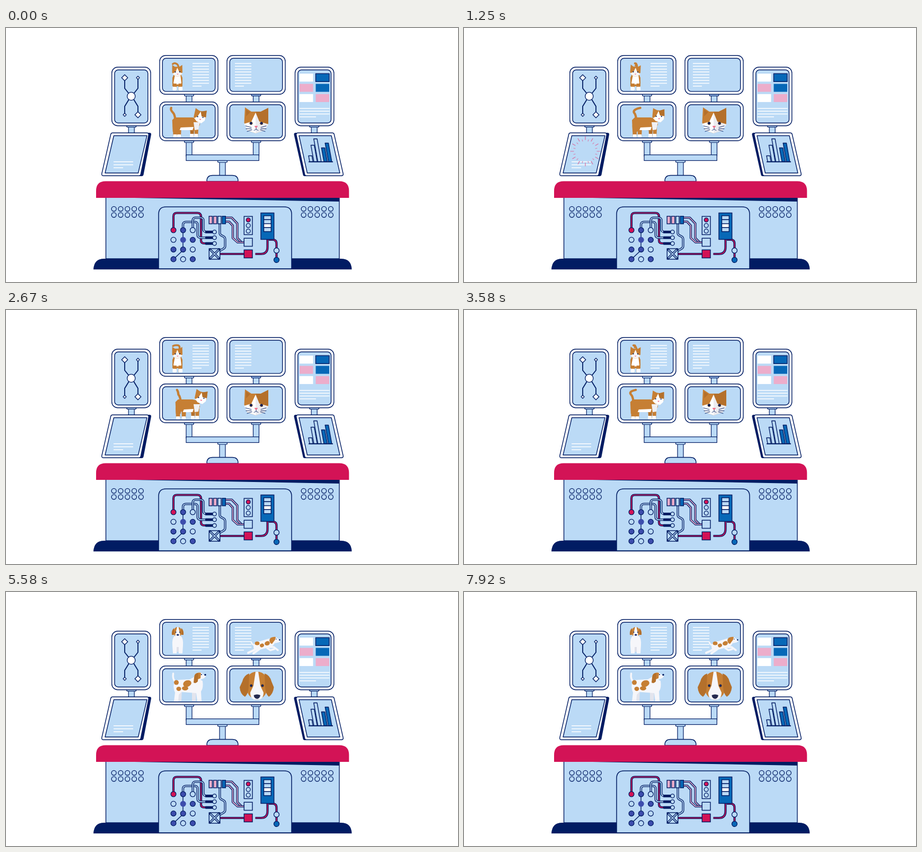
These frames come from a looping animation (853x480 px, 8 s). An HTML page:

```html
<!DOCTYPE html>
<html lang="en">
<head>
<meta charset="utf-8">
<title>Pet control desk</title>
<style>
  html, body { margin: 0; width: 100%; height: 100%; overflow: hidden; background: #fff; }
  svg { display: block; width: 100%; height: 100%; }
</style>
</head>
<body>
<svg id="stage" viewBox="0 0 853 480"></svg>
<script>
const NAVY = '#011c63', SKY = '#bbdaf6', RED = '#d31356', PINK = '#ecadcb',
      BLUE = '#0768b7', INDIGO = '#3d4dad', FUR = '#c67f34', SHADE = '#b4702b',
      WHITE = '#fff', DOG = '#f6f6fa';

const rect = (x, y, x2, y2, fill, r = 0, stroke = NAVY, w = 1.4) =>
  `<rect x="${x}" y="${y}" width="${x2 - x}" height="${y2 - y}" rx="${r}" fill="${fill}" stroke="${stroke}" stroke-width="${w}"/>`;
const block = (x, y, x2, y2, fill, r = 0) => rect(x, y, x2, y2, fill, r, 'none');
const path = (d, fill = 'none', stroke = 'none', w = 1.4) =>
  `<path d="${d}" fill="${fill}" stroke="${stroke}" stroke-width="${w}" stroke-linejoin="round"/>`;
const line = (d, stroke, w) => `<path d="${d}" fill="none" stroke="${stroke}" stroke-width="${w}" stroke-linecap="round" stroke-linejoin="round"/>`;
const dot = (x, y, r, fill, stroke = NAVY, w = 1.3) =>
  `<circle cx="${x}" cy="${y}" r="${r}" fill="${fill}" stroke="${stroke}" stroke-width="${w}"/>`;
const oval = (x, y, rx, ry, fill, turn = 0) =>
  `<ellipse cx="${x}" cy="${y}" rx="${rx}" ry="${ry}" fill="${fill}" transform="rotate(${turn} ${x} ${y})"/>`;
const wire = (d, core) => path(d, 'none', NAVY, 4.2) + path(d, 'none', core, 1.7);
const range = n => [...Array(n).keys()];

function monitor(x, y, x2, y2) {
  return rect(x, y, x2, y2, WHITE, 11) + rect(x + 5.3, y + 5.3, x2 - 5.3, y2 - 5.3, SKY, 6.5);
}

function neck(x, y, bottom, cap = SKY) {
  return rect(x - 5.5, y, x + 5.5, bottom, SKY, 0, NAVY, 1.2) + rect(x - 9, y, x + 9, y + 3.5, cap, 1.7, NAVY, 1.2);
}

function textLines(x, y, width, count, lastWidth, gap = 5.35) {
  return range(count).map(i =>
    path(`M${x} ${y + i * gap}h${i < count - 1 ? width : lastWidth}`, 'none', WHITE, 1.5)).join('');
}

function tablet(outer, inner, dark) {
  return line(dark, NAVY, 6) + path(dark, NAVY) +
    path(outer, NAVY, NAVY, 8) + path(outer, WHITE, WHITE, 5.2) +
    path(inner, SKY, NAVY, 1.4);
}

function screens() {
  const tiles = [WHITE, BLUE, PINK, BLUE, WHITE, PINK].map((c, i) => {
    const x = i % 2 ? 584.5 : 554, y = 86.3 + 19.3 * (i >> 1);
    return rect(x, y, x + 25.5, y + 15, c, 0, i === 1 ? NAVY : 'none');
  }).join('');
  const diamond = (x, y, r) => path(`M${x} ${y - r}l${r} ${r}l${-r} ${r}l${-r} ${-r}z`, WHITE, NAVY, 1.3);
  return neck(345.5, 125, 140) + neck(472, 125, 140, '#8fb4e4') +
    neck(345.5, 213, 242) + neck(472, 213, 242) +
    rect(340, 239.7, 477.3, 250.5, SKY, 0, NAVY, 1.2) + neck(408.5, 250.5, 279) +
    path('M379 290v-1q0-10.500 11-10.500h37q11 0 11 10.500v1z', SKY, NAVY) +
    neck(236.700, 184, 199) + neck(581.700, 184, 199) +
    [290, 417].map(x => monitor(x, 52, x + 110, 125.2) + monitor(x, 139.700, x + 110, 213)).join('') +
    monitor(199.700, 74, 273, 184.800) + monitor(545.500, 74, 618.800, 184.800) +
    textLines(352, 67, 31, 9, 17) + textLines(432, 67, 31, 9, 17) +
    line('M224 94v20l8 10M249 94v20l-8 10M224 164v-16l8-13M249 164v-16l-8-13', NAVY, 1.8) +
    dot(236.300, 129, 7.600, WHITE) +
    diamond(224, 94, 5.800) + diamond(249, 94, 3) + diamond(224, 164, 3) + diamond(249, 164, 5.800) +
    tiles + textLines(554, 152, 56.500, 4, 31, 5.300);
}

function tablets() {
  const bars = [[573, 11], [581, 31], [588.5, 43], [600, 26], [608.5, 35]].map(([x, h], i) =>
    path(`M${x} 252.500l${-h * .18} ${-h}h6.300l${h * .18} ${h}z`, i < 3 ? SKY : BLUE, NAVY, 1.4)).join('');
  return tablet('M201 201.500H266L251 276H184z', 'M203.500 203.500H266L249.500 274H187z', 'M268 201L271 201L256.500 277L252 277z') +
    textLines(203, 252.700, 37, 3, 18, 5.700) +
    tablet('M551 201.500H616L633 276H567z', 'M553 203.500H614L630 274H568.500z', 'M549 201L546.500 201L563.500 277L567 277z') +
    bars + path('M571 252.900h46', 'none', NAVY, 1.6);
}

function desk() {
  const holes = [203.600, 561.700].map(x => range(10).map(i =>
    dot(x + 12.800 * (i % 5), 341.800 + 11.500 * Math.floor(i / 5), 4.500, SKY)).join('')).join('');
  return path('M165 456.300q1-20.300 20-20.300H632q20 0 20.500 20.300z', NAVY) +
    rect(188.500, 315, 629, 436, SKY) + path('M188 320H629V328z', NAVY) +
    path('M170 321v-13q0-18.500 18-18.500H629q18.300 0 18.300 18.500v13z', RED) + holes +
    path('M288 455V352q0-14 14-14H525q14 0 14 14V455z', SKY, NAVY, 1.5);
}

function panel() {
  const knobs = [RED, INDIGO, SKY, SKY, INDIGO, INDIGO, INDIGO, INDIGO, SKY, INDIGO, SKY, INDIGO];
  const sockets = [385.500, 396.300, 407.300].map(y =>
    block(376, y - 2.500, 391, y + 2.500, NAVY, 1) + dot(393.500, y, 3.600, SKY)).join('');
  const tubes = [PINK, PINK, SKY, BLUE].map((c, i) =>
    rect(383.200 + 8.300 * i, 355.700, 389.400 + 8.300 * i, 370, c)).join('');
  return wire('M316 379V356q0-6.500 6.500-6.500H361q7 0 7 7V401q0 6 6 6h4', RED) +
    wire('M334 379v-7q0-5.500 6-5.500h16q5.500 0 5.500 5.500v18q0 6.300 6 6.300h9', SKY) +
    wire('M352.500 379v-15q0-5.500 5.500-5.500h9q5.500 0 5.500 5.500v15q0 6.500 6 6.500', SKY) +
    wire('M414 358.500h12l10.500 11V397l8 8h5', PINK) +
    wire('M414 366h7l7 7.500V397l9 8h12', PINK) +
    wire('M403.500 370v18q0 3 5 5t5 6v13q0 4-5 6l-5 3', SKY) +
    wire('M404 427h46', RED) + wire('M470.500 427H481q12.500 0 12.500-13V399', RED) +
    wire('M496 400h7q7.500 0 7.500 8V438', RED) +
    line('M317 436L334 420V382', NAVY, 1.4) +
    knobs.map((c, i) => dot(316 + 18.200 * (i % 3), 382 + 18.300 * Math.floor(i / 3), 4.900, c, i === 4 ? INDIGO : NAVY)).join('') +
    sockets + tubes +
    rect(449.300, 356, 465, 390.500, SKY) +
    [RED, SKY, SKY].map((c, i) => dot(457.200, 362.800 + 10.500 * i, 3.900, c)).join('') +
    rect(449.300, 397.300, 465, 412.500, SKY) + rect(449.300, 419.300, 465, 434.500, RED) +
    rect(383.300, 417, 403.800, 437, SKY) +
    path('M384 417.500L403 436.500M403 417.500L384 436.500', 'none', NAVY, 4) +
    path('M385.500 419L401.500 435M401.500 419L385.500 435', 'none', SKY, 1.500) +
    rect(481, 349.500, 505.700, 399.500, BLUE) +
    range(4).map(i => rect(486.500, 354.800 + 7.500 * i, 500.300, 362.300 + 7.500 * i, i === 2 ? WHITE : SKY)).join('') +
    dot(510.500, 420.500, 5, SKY) + dot(510.500, 438.300, 5, BLUE);
}

function catFace() {
  return path('M451 150L463 158H481L495 151V181L488 193L471 199L455 193L449.500 179z', FUR) +
    path('M471 158H481L495 151V181L478 177z', SHADE) +
    path('M471 160L463 177L449.500 181L455 193L471 199L488 193L495 182L478 177z', WHITE) +
    path('M471 160L478 177L495 182L488 193L471 199z', '#ececf0') +
    path('M453 154L461 159L453 167zM492 155L484 159L492 167z', SHADE) +
    dot(462.500, 180, 2.600, NAVY, '#77522d', 1) + dot(482.200, 180, 2.600, NAVY, '#77522d', 1) +
    path('M468.500 185h7l-3.500 4.500z', '#ee718f') +
    line('M472 189v2.500l-4 2M472 191.500l4 2', NAVY, .800) +
    line('M463 188l-11-3M463 190.500h-10M464 192.500l-9 3M481 188l10-3M481 190.500h10M480 192.500l9 3', NAVY, .900);
}

// Tail swing and body sway share one two-second rhythm.
function cats(t) {
  const wave = peak => Math.cos(2 * Math.PI * (t / 2000 - peak));
  const sway = wave(.4), curl = wave(.66), dx = 3.5 + 3.5 * sway;
  const rootX = 318 + 1.7 * dx, tipX = rootX - 2 + 10 * curl;
  const tail = `M${rootX} 171Q${rootX - 1} 163 ${rootX - 4} 160Q${rootX - 7 + sway * 3} 154 ${tipX} 151`;
  const back = x => path(`M${x} 184h9l-1 22h-7z`, FUR) + block(x + 1, 201, x + 8, 206.500, WHITE, 1);
  const front = (x, c) => path(`M${x} 186h8l-1 20h-6z`, c) + block(x, 200, x + 7, 206.500, WHITE, 1);
  const side = line(tail, FUR, 4.300) +
    back(321 + dx * 1.5) + front(347 + dx * .3, SHADE) +
    path(`M${313 + dx} 174L${318 + dx} 169H352L365 172L366 183L358 194L330 192L${323 + dx} 196H${314 + dx}z`, FUR) +
    path(`M${329 + dx} 188L354 187L352 193L${327 + dx} 193z`, WHITE) +
    back(314 + dx * .9) + front(355 + dx * .3, FUR) +
    path('M354 178L366 178L363 192L356 193z', '#f0f0f3') +
    `<g transform="translate(${dx * .3} ${-dx * .35}) rotate(${-5 * curl} 366 168)">` +
    path('M357 152L364 156.500L371 158L378 156L377 171L370 179L360 177L354 169z', FUR) +
    path('M367 158L361 168L355 171L360 177L369 180L375 175L377 169L369 167z', WHITE) +
    path('M367 158L378 156L377 168L369 167z', SHADE) +
    dot(361.500, 168, 1.100, NAVY, 'none') + dot(371.500, 169, 1.100, NAVY, 'none') +
    path('M364.500 172h4l-2 2.500z', '#ee718f') + '</g>';

  const tip = 321 + 6 * curl;
  const small = line(`M326 79Q${328 + 2 * sway} 68 ${322 + 3 * sway} 66.800Q${tip} 66 ${tip - 3} ${69 + 2 * curl}`, FUR, 3.600) +
    path('M317 87H330L333 94V110H314V94z', FUR) +
    path('M319 88H329L331 104L328 109L324 106L319 109L316 104z', WHITE) +
    path('M315 105h7v13h-6.500zM325.500 105h7l-.500 13h-6.500z', FUR) +
    block(314.500, 111, 322, 118, WHITE, 1.500) + block(325.500, 111, 333, 118, WHITE, 1.500) +
    `<g transform="rotate(${3 * curl} 323.500 83)">` +
    path('M314 69.500L319 73H328L333 70V84L329 90L323.500 92L318 90L313.500 84z', FUR) +
    path('M323.500 75L320 83L314 86L318 90L323.500 92L329 90L333 86L327 83z', '#f7f5f3') +
    dot(319.500, 83, 1.100, NAVY, 'none') + dot(328, 83, 1.100, NAVY, 'none') +
    path('M322 86.500h3.500l-1.700 2z', '#ee718f') + '</g>';
  return side + small + catFace();
}

function runningDog(t) {
  const phase = 2 * Math.PI * (t - 6580) / 670;
  const lift = .7 * Math.sin(phase), swing = 1.5 * Math.sin(phase);
  return `<g transform="translate(0 ${lift})">` +
    line('M470 100Q465 101 463 95', DOG, 2.600) +
    line(`M474 106L${466 + swing} 111L457 ${115 + swing}M478 108L${474 - swing} 111L467 116`, DOG, 4) +
    line(`M497 104L${505 - swing} 104L513 ${110 + swing}M493 106L${499 + swing} 110L506 108`, DOG, 3.600) +
    path('M467 103Q468 93 480 93L496 88L508 94Q504 106 491 106L475 110Q467 110 467 103z', DOG) +
    oval(474, 97, 4.500, 3.500, FUR) + oval(483, 101, 4, 3.500, FUR, -20) + oval(493, 97, 5, 4, FUR, -20) +
    oval(507, 91, 8, 5.500, DOG, 10) + path('M497 91Q499 84 509 85L508 90L502 98Q498 98 497 91z', FUR) +
    path('M511 89l6 1.500q1 5-5 5z', DOG) + dot(516.300, 90.500, 1.300, NAVY, 'none') + dot(510, 89, .800, NAVY, 'none') +
    '</g>';
}

function dogs(t) {
  const small = path('M318 83H330Q335 88 334 101L333 116H326L325 105H323L322 116H315L314 101Q313 88 318 83z', DOG) +
    path('M322 104h4v9h-4z', '#dfe0e9') +
    oval(324, 75.500, 8, 9.500, FUR) + path('M323 66h2.500l2.500 12v7h-8v-7z', DOG) +
    oval(324, 82, 4.800, 4, DOG) +
    path('M317 68Q312 73 313 81L317 81zM331 68Q336 73 335 81L331 81z', SHADE) +
    dot(320.500, 76, 1, NAVY, 'none') + dot(328, 76, 1, NAVY, 'none') + oval(324.200, 81, 2.300, 1.600, NAVY);
  const side = line('M319 169Q314 164 315.500 154', DOG, 3.500) +
    path('M324 184h8l-1 22h-7zM351 184h8l-1 22h-7z', '#e3e4ed') +
    path('M317 173Q319 166 327 166L347 165L356 160L371 168Q373 181 368 188L369 206.500H361L359 191L331 189L326 194L325 206.500H317L319 190Q315 181 317 173z', DOG) +
    oval(321.500, 171, 4.500, 4.500, FUR) + oval(326, 183, 4.500, 4, FUR) +
    oval(342, 173, 8, 6, FUR, -20) + oval(338, 182, 6, 4, FUR) +
    path('M354 163Q356 152 366 152Q371 153 372 156L377 158Q377 163 368 165L362 170L355 171z', DOG) +
    path('M358 155Q362 151 368 153L367 163L362 165z', FUR) +
    path('M355 162Q355 153 363 153L362 169Q358 174 354 171z', SHADE) +
    oval(376, 156.500, 1.700, 1.700, NAVY) + dot(369, 156, 1, NAVY, 'none');
  const face = path('M458 158Q463 150.500 473.500 150.500T489 158L493 184Q489 202 473.500 202T454 184z', FUR) +
    path('M471 150.500H476L480 177L486 190Q486 204 473.500 204T461 190L467 177z', DOG) +
    path('M459 154Q449 157 446 169L441 180Q442 193 451 198Q457 193 458 180zM488 154Q498 157 501 169L505.500 180Q504 193 496 198Q490 193 489 180z', SHADE) +
    dot(462.800, 177, 2.400, NAVY, '#77522d', 1) + dot(484, 177, 2.400, NAVY, '#77522d', 1) +
    path('M467.500 195Q474 192 480 195Q479 201 474 202Q468 201 467.500 195z', '#252a50') +
    line('M470 204h7', '#b9bccb', 1);
  return side + small + face + runningDog(t);
}

function burst(t) {
  const p = (t - 850) / 900;
  if (p <= 0 || p >= 1) return '';
  const reach = 41 * (1 - (1 - p) ** 2), fade = Math.min(1, (1 - p) * 3);
  const ray = (angle, from, to, color) => {
    const x = Math.cos(angle), y = Math.sin(angle);
    return path(`M${229 + x * from} ${233 + y * from}L${229 + x * to} ${233 + y * to}`, 'none', color, 1.200);
  };
  const rays = range(24).map(i => {
    const angle = i * Math.PI / 12;
    return i % 2 ? ray(angle, reach * .68, reach * .82, '#d483b0') : ray(angle, reach * .76, reach, '#d76f9f');
  }).join('');
  return `<g opacity="${fade}" clip-path="url(#glass)">${rays}</g>`;
}

const stage = document.getElementById('stage');
stage.innerHTML = '<defs><clipPath id="glass"><path d="M203.500 203.500H266L249.500 274H187z"/></clipPath></defs>' +
  screens() + tablets() + desk() + panel() + '<g id="pets"></g><g id="spark"></g>';
const pets = document.getElementById('pets'), spark = document.getElementById('spark');

const LOOP = 8000, SWITCH = 5400, STEP = 1000 / 12;
function draw() {
  const time = performance.now() % LOOP;
  const t = Math.floor(time / STEP + .05) * STEP;
  pets.innerHTML = t < SWITCH ? cats(t) : dogs(t);
  spark.innerHTML = burst(t);
  requestAnimationFrame(draw);
}
draw();
</script>
</body>
</html>
```
